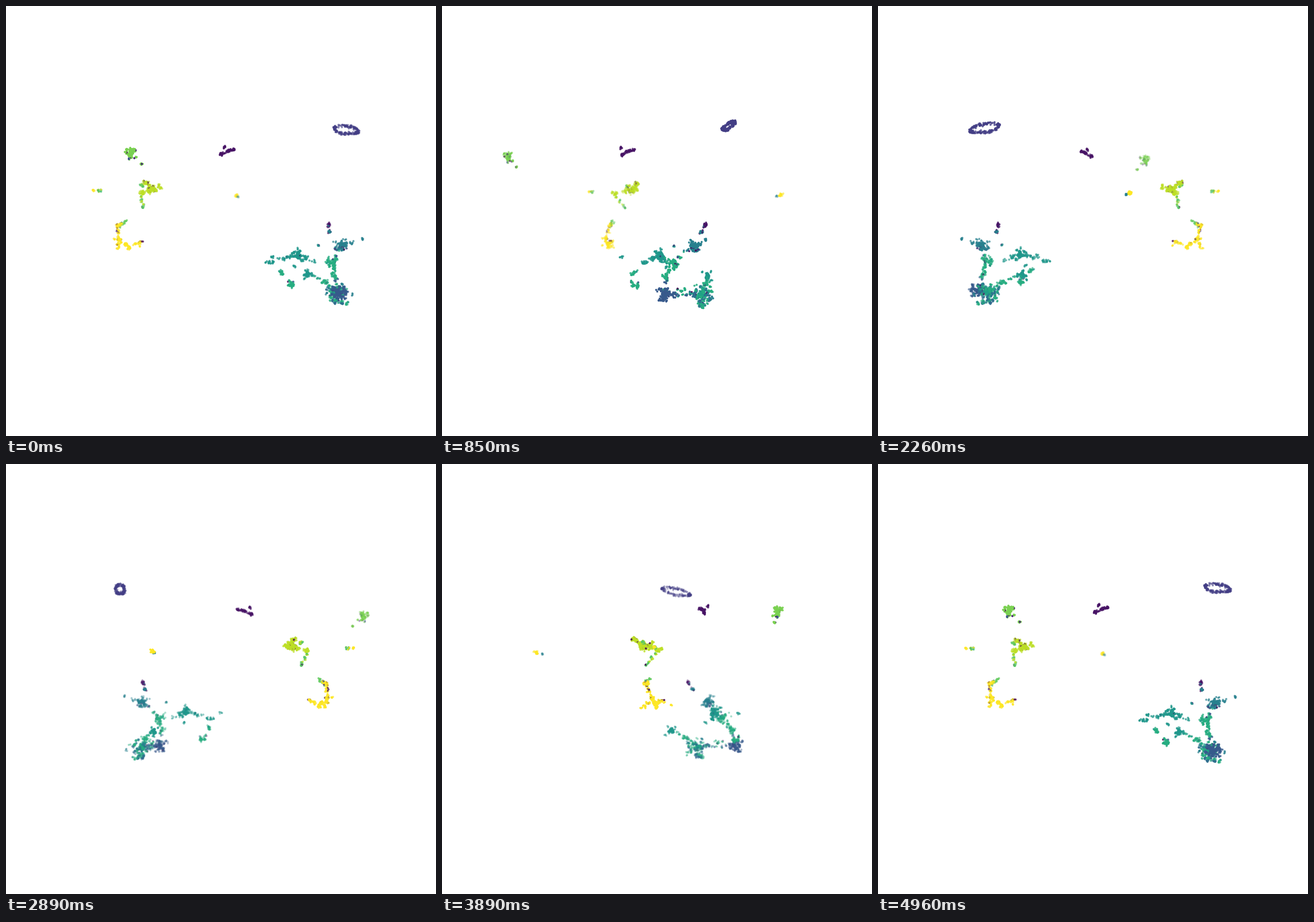
Animation, 748 px wide and 748 px high, one loop 4.99 s. Source, as a matplotlib script:

```python
import numpy as np
import matplotlib.pyplot as plt
from matplotlib.animation import FuncAnimation

SIZE, DPI = 748, 100
FRAMES, LOOP_MS = 135, 4990
CENTER_X, CENTER_Y = 384, 371
PERSPECTIVE = 0.00023
DOT_PX = 3.7

INDIGO, PURPLE, BLUE, STEEL, TEAL = 0.18, 0.05, 0.28, 0.43, 0.53
GREEN, LEAF, LIME, YELLOW = 0.62, 0.8, 0.9, 1.0

rng = np.random.default_rng(12)
cloud = []


def shortest_tree(nodes):
    """Links of the minimum spanning tree over the nodes."""
    if len(nodes) == 1:
        return np.array([(0, 0)])
    joined, links = [0], []
    while len(joined) < len(nodes):
        gaps = np.linalg.norm(nodes[joined][:, None] - nodes[None], axis=2)
        gaps[:, joined] = np.inf
        row, new = np.unravel_index(gaps.argmin(), gaps.shape)
        links.append((joined[row], new))
        joined.append(new)
    return np.array(links)


def cluster(n, spread, *keys, knot=0.35, strays=0.03):
    """Small clumps along the tree of key points (x, y, height, label)."""
    keys = np.array(keys, float)
    nodes = keys[:, :3]
    links = shortest_tree(nodes)
    lengths = np.linalg.norm(nodes[links[:, 0]] - nodes[links[:, 1]], axis=1) + 1
    m = max(2, n // 4)
    a, b = links[rng.choice(len(links), m, p=lengths / lengths.sum())].T
    t = rng.random(m)
    snapped = rng.random(m) < knot
    t = np.where(snapped, t.round(), t)[:, None]
    width = spread * np.where(snapped | (a == b), 1, 0.45)[:, None]
    clumps = nodes[a] * (1 - t) + nodes[b] * t
    clumps += rng.normal(size=(m, 3)).clip(-1.8, 1.8) * width * (1, 1, 0.8)
    pick = rng.integers(m, size=n)
    points = clumps[pick] + rng.normal(0, 1.1, (n, 3))
    ends = np.where(rng.random(n) < t[pick, 0], b[pick], a[pick])
    labels = keys[ends, 3]
    odd = rng.random(n) < strays
    labels[odd] = rng.choice([0.0, 0.0, 0.1, 0.25], odd.sum())
    cloud.append(np.column_stack([points, labels]))


def ring(n):
    """Tilted loop of indigo points."""
    t = rng.random(n // 3) * 2 * np.pi
    loop = np.stack([208 + 20 * np.cos(t),
                     12 - 21 * np.cos(t) + 8 * np.sin(t),
                     -156 - 7 * np.sin(t) + 3 * np.cos(t)], axis=1)
    points = np.repeat(loop, 3, axis=0) + rng.normal(0, 1.3, (len(t) * 3, 3))
    cloud.append(np.column_stack([points, np.full(len(points), INDIGO)]))


def small_clusters():
    ring(210)
    cluster(75, 1.3, (-10, -74, -111, PURPLE), (2, -71, -117, PURPLE),
            (11, -63, -120, PURPLE))
    cluster(10, 0.5, (-4, -80, -123, PURPLE))
    cluster(95, 4.5, (-158, -222, -114, LEAF), (-158, -221, -103, LEAF),
            knot=0.6, strays=0.08)
    cluster(8, 0.6, (-141, -215, -91, LEAF))
    cluster(24, 2.4, (18, 229, -43, YELLOW), strays=0)
    cluster(4, 0.8, (20, 219, -42, STEEL))
    cluster(22, 0.5, (-231, -27, -50, YELLOW), (-217, -25, -50, 0.7), strays=0)


def lime_cluster():
    hub = (-129, 7, -52, LIME)
    cluster(235, 3.2, hub, (-141, 23, -64, LIME), (-147, -18, -45, LIME),
            (-112, 6, -53, LIME), (-146, 4, -20, 0.74), strays=0.05)
    cluster(25, 1.2, hub, (-152, 8, -60, 0.74))
    cluster(75, 6, hub, strays=0.06)


def yellow_cluster():
    cluster(240, 3, (-177, -5, 2, 0.76), (-187, -6, 12, YELLOW),
            (-189, -16, 34, YELLOW), (-187, 0, 52, YELLOW),
            (-170, -20, 48, YELLOW), (-150, -24, 38, YELLOW),
            (-153, -38, 48, YELLOW), strays=0.05)


def mainland():
    hub, mid = (196, -50, 43, STEEL), (119, -72, 60, TEAL)
    knoll, fork = (181, -80, 72, GREEN), (140, 9, 94, TEAL)
    deep, lump = (191, -100, 125, BLUE), (190, -32, 125, 0.57)
    cluster(560, 3, hub, mid, knoll, fork, deep, lump,
            (231, -44, 38, STEEL), (154, -64, 49, 0.5), (73, -74, 74, TEAL),
            (146, -75, 70, TEAL), (183, -95, 97, GREEN), (143, 18, 87, TEAL),
            (134, 21, 107, TEAL), (170, -10, 109, GREEN), (218, -25, 130, STEEL),
            (186, -31, 144, 0.36), (208, -38, 148, GREEN))
    cluster(110, 6.5, hub, strays=0.04)
    cluster(50, 7, mid)
    cluster(65, 7, knoll)
    cluster(35, 4.5, fork)
    cluster(180, 6.5, deep)
    for tone in (GREEN, GREEN, STEEL, 0.36):
        cluster(55, 10, (*lump[:3], tone))
    # stalk and loose islands
    cluster(45, 0.9, (177, -15, 8, PURPLE), (178, -25, 23, STEEL))
    cluster(24, 1.3, (88, -90, 86, TEAL), (94, -111, 92, GREEN))
    cluster(50, 3.5, (111, -111, 110, GREEN))
    cluster(6, 1.2, (79, -122, 63, TEAL))
    cluster(6, 1.2, (118, -58, 80, TEAL))
    cluster(20, 6, (195, -66, 117, GREEN), strays=0.15)


small_clusters()
lime_cluster()
yellow_cluster()
mainland()
px, py, pz, labels = np.concatenate(cloud).T
colors = plt.get_cmap("viridis")(labels)

fig = plt.figure(figsize=(SIZE / DPI, SIZE / DPI), dpi=DPI, facecolor="white")
ax = fig.add_axes([0, 0, 1, 1])
ax.set(xlim=(0, SIZE), ylim=(SIZE, 0))
ax.axis("off")
dots = ax.scatter(px, pz, s=(DOT_PX * 72 / DPI) ** 2, linewidths=0)


def draw(i):
    angle = 2 * np.pi * i / FRAMES
    c, s = np.cos(angle), np.sin(angle)
    side, depth = px * c + py * s, py * c - px * s
    scale = 1 / (1 + PERSPECTIVE * depth)
    shade = colors.copy()
    shade[:, 3] = 1 - 0.7 * (depth - depth.min()) / np.ptp(depth)
    order = np.argsort(-depth)
    spots = np.column_stack([CENTER_X + side * scale, CENTER_Y + pz * scale])
    dots.set_offsets(spots[order])
    dots.set_facecolors(shade[order])
    return (dots,)


anim = FuncAnimation(fig, draw, frames=FRAMES, interval=LOOP_MS / FRAMES,
                     init_func=lambda: draw(0), repeat=True, repeat_delay=0)
plt.show()
```
